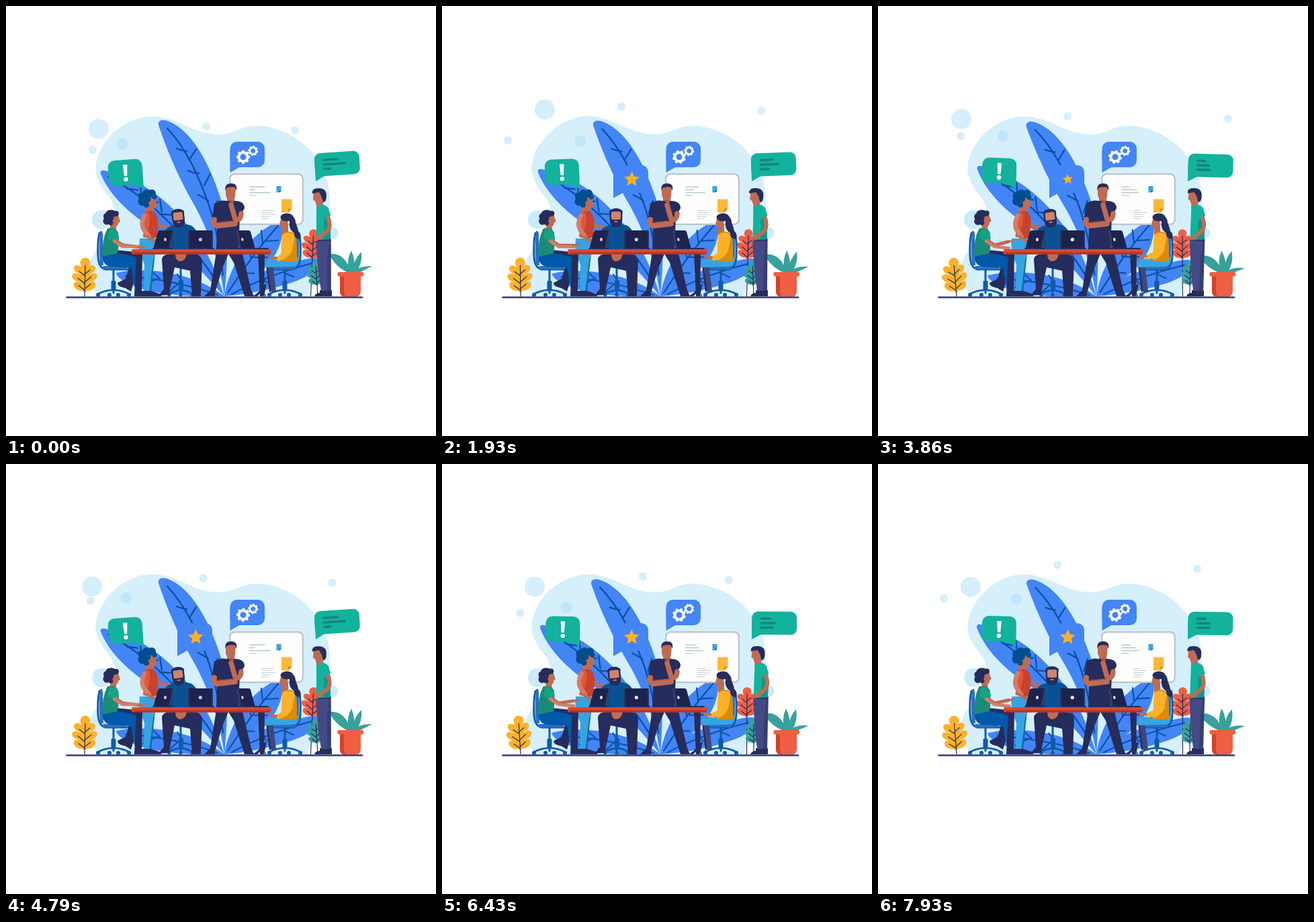
Animation, 640 px wide and 640 px high, one loop 8000 ms. Source, as an HTML page with a canvas:

```html
<!DOCTYPE html>
<html lang="en">
<head>
<meta charset="utf-8">
<title>Team meeting</title>
<style>
html, body { margin: 0; width: 100%; height: 100%; overflow: hidden; background: #fff; }
canvas { display: block; width: 100vw; height: 100vh; }
</style>
</head>
<body>
<canvas id="stage" width="640" height="640"></canvas>
<script>
const g = document.getElementById('stage').getContext('2d');
const LOOP = 8000, CYCLE = 6000, SWAY = 2400;
const NAVY = '#262c5b', BLUE = '#4385f5', VEIN = '#0a50a5', PALE = '#d5effb',
  CHAIR = '#0f5ba8', DENIM = '#0058a8', SKY = '#37a4e2', SKIN = '#bf6b54', TAN = '#d0806a',
  TEAL = '#13b29d', GREEN = '#1c8a78', GOLD = '#fdb12a', OCHRE = '#d88c0c', CORAL = '#f05e43',
  BRICK = '#c9422c', INDIGO = '#434a85', LEAF = '#38a19b';

const mix = (a, b, k) => a + (b - a) * k;
const smooth = (a, b, x) => {
  const k = Math.min(1, Math.max(0, (x - a) / (b - a)));
  return k * k * (3 - 2 * k);
};

function fill(color, d) {
  g.fillStyle = color;
  g.fill(new Path2D(d));
}
function line(color, width, d) {
  g.strokeStyle = color;
  g.lineWidth = width;
  g.lineCap = g.lineJoin = 'round';
  g.stroke(new Path2D(d));
}
function oval(color, x, y, rx, ry = rx, turn = 0) {
  g.fillStyle = color;
  g.beginPath();
  g.ellipse(x, y, rx, ry, turn, 0, 7);
  g.fill();
}
function box(color, x, y, w, h, r) {
  g.fillStyle = color;
  g.beginPath();
  g.roundRect(x, y, w, h, r);
  g.fill();
}
function pivot(x, y, turn, draw, scale = 1) {
  g.save();
  g.translate(x, y);
  g.rotate(turn);
  g.scale(scale, scale);
  g.translate(-x, -y);
  draw();
  g.restore();
}

// Closed smooth track through [seconds, x, y] stops.
function track(stops, ms, period = CYCLE / 1000) {
  const n = stops.length, t = ms / 1000 % period;
  const stop = i => {
    const wrap = Math.floor(i / n), p = stops[i - wrap * n];
    return [p[0] + wrap * period, p[1], p[2]];
  };
  let i = n - 1;
  while (stops[i][0] > t) i--;
  const [a, b, c, d] = [-1, 0, 1, 2].map(o => stop(i + o));
  const h = c[0] - b[0], k = (t - b[0]) / h, k2 = k * k, k3 = k2 * k;
  return [1, 2].map(q => {
    const m = (c[q] - a[q]) / (c[0] - a[0]) * h, e = (d[q] - b[q]) / (d[0] - b[0]) * h;
    return (2 * k3 - 3 * k2 + 1) * b[q] + (k3 - 2 * k2 + k) * m
      + (3 * k2 - 2 * k3) * c[q] + (k3 - k2) * e;
  });
}

const drifters = [
  [6, PALE, [[0, 298, 179], [1.07, 298, 150], [1.93, 267, 150], [3.86, 282, 164], [5.71, 304, 176]]],
  [6, PALE, [[0, 430, 185], [1.07, 430, 156], [1.93, 475, 156], [3.86, 521, 168], [5.71, 436, 185]]],
  [6, PALE, [[0, 129, 214], [1.07, 98, 229], [1.93, 98, 200], [3.86, 123, 194], [5.71, 126, 215]]],
  [8.5, '#bfe7f9', [[0, 173, 206], [1.07, 203, 222], [1.93, 206, 201], [3.86, 186, 194], [5.71, 173, 207]]]
];
const bigDrift = [[0, 138, 183], [1.07, 138, 154], [1.93, 153, 154], [2.9, 142, 136],
  [3.5, 129, 151], [3.86, 124, 168], [4.6, 127, 181], [5.71, 135, 184]];

function backdrop(t) {
  fill(PALE, 'M140 433C118 408 118 377 140 358C163 340 170 312 155 286C140 269 131 252 134 235'
    + 'C140 198 178 164 218 164C260 166 274 190 317 191C343 190 350 178 373 178'
    + 'C426 180 481 222 482 288C482 340 470 350 462 385Q455 415 448 433Z');
  oval('#cbebfa', 142, 318, 14);
  oval('#cbebfa', 486, 338, 8.5);
  const [x, y] = t < CYCLE ? track(bigDrift, t) : [138, 183];
  oval(PALE, x, y, 15);
  for (const [r, color, stops] of drifters) oval(color, ...track(stops, t), r);
}

function bigLeaves(s) {
  const X = 325, Y = 432;
  pivot(X, Y, -.03 * s, () => {
    fill(BLUE, 'M227 177C226 169 234 168 243 172C279 187 304 239 318 282C330 318 332 365 325 432'
      + 'C320 390 303 336 279 294C254 250 238 210 227 177Z');
    line(VEIN, 2.3, 'M240 182C269 213 287 253 303 299Q316 340 323 400'
      + 'M254 212Q261 215 269 216M283 213L274 227M271 245Q279 249 287 249M304 250L295 267'
      + 'M286 281Q296 286 301 290M315 290L309 308');
  });
  pivot(X, Y, .045 * s, () => {
    fill(BLUE, 'M141 250C139 243 146 244 155 247C203 258 247 294 277 335C302 366 315 402 325 432'
      + 'C294 398 266 366 225 335C180 308 153 279 141 250Z');
    line(VEIN, 2.3, 'M152 254C207 283 260 330 310 405M180 272L196 274M205 292L226 292'
      + 'M200 268L202 287M229 310L249 311M229 288L232 307M249 308L252 326M251 330L272 333');
  });
  pivot(X, Y, -.03 * s, () => {
    fill(BLUE, 'M164 397C205 387 280 396 325 432C275 434 212 429 185 414Q164 405 164 397Z');
    line(VEIN, 2, 'M178 402Q250 407 315 430M215 393L229 406M205 416L225 406M255 399L263 411M243 425L259 411');
  });
  pivot(X, Y, -.015 * s, () => {
    fill(BLUE, 'M410 319C416 338 407 365 390 385C373 404 348 420 325 432C329 404 344 372 366 348C382 332 400 321 410 319Z');
    line(VEIN, 2.2, 'M405 327Q365 372 330 427M382 353L380 334M386 350L405 349M365 376L361 359M369 374L389 374M350 398L345 382M351 397L369 398');
  });
  pivot(X, Y, .025 * s, () => {
    fill(BLUE, 'M464 376C466 394 447 405 421 413C391 423 360 429 325 432C350 409 385 392 417 384C444 377 458 373 464 376Z');
    line(VEIN, 2, 'M455 383Q390 400 336 429M417 395L408 387M414 397L428 403M386 407L379 399M382 408L395 414');
  });
}

function starBubble(t) {
  const grow = smooth(40, 600, t);
  if (!grow) return;
  pivot(255, 286, 0, () => {
    box(BLUE, 255, 237, 52, 41, 10);
    fill(BLUE, 'M255 247L255 286L271 277Z');
    const pulse = 1 - .32 * smooth(3200, 3800, t) * (1 - smooth(3950, 4600, t));
    const turn = .12 * Math.sin(t / 1000 * Math.PI / 1.5 + 2.4);
    pivot(282.5, 258, turn, () => {
      g.fillStyle = GOLD;
      g.beginPath();
      for (let i = 0; i < 10; i++) {
        const r = i % 2 ? 5.6 : 12, a = i * Math.PI / 5 - Math.PI / 2;
        g.lineTo(282.5 + r * Math.cos(a), 258 + r * Math.sin(a));
      }
      g.fill();
    }, pulse);
  }, grow);
}

function bars(color, width, x, y, gap, from, to, s) {
  from.forEach((len, i) => {
    const yy = y + i * gap;
    line(color, width, `M${x} ${yy}h${mix(len, to[i], s)}`);
  });
}

function board(s) {
  box('#bdc6c9', 332, 249, 111, 77, 8);
  box('#fefefe', 334.3, 251.3, 106.4, 72.4, 6);
  bars('#b5c9cc', 1.4, 363, 269.3, 4.2, [22, 7, 30, 8], [9, 25, 23, 11], s);
  bars('#bccbce', 1, 380.5, 304.4, 3.1, [18, 15, 20, 12, 9], [8, 20, 13, 15, 10], s);
  fill(SKY, 'M402.5 268h7v7l-2.5 2.5h-4.5Z');
  fill(NAVY, 'M409.5 275l-2.5 2.5v-2.5Z');
  fill('#fdb83b', 'M410 287.5h15.5v14l-5.5 6h-10Z');
  fill(OCHRE, 'M425.5 301.5l-5.5 6v-6Z');
}

function gear(x, y, r, turn) {
  pivot(x, y, turn, () => {
    g.strokeStyle = '#fff';
    g.lineWidth = r * .38;
    g.beginPath();
    g.arc(x, y, r * .65, 0, 7);
    g.stroke();
    for (let i = 0; i < 8; i++)
      pivot(x, y, i * Math.PI / 4, () => box('#fff', x - r * .19, y - r, r * .38, r * .3, .5));
  });
}

function bubbles(t, s) {
  box(BLUE, 333.5, 202, 51.5, 38, 10);
  fill(BLUE, 'M333.5 215V248L349 239Z');
  gear(353, 224.7, 10, t / 1500);
  gear(367.7, 215.6, 7.6, -t / 1200 + .2);

  pivot(205, 271, mix(-.07, .06, s), () => {
    box(TEAL, 154, 227, 51, 38, 10);
    fill(TEAL, 'M188 264L205 250V272Z');
    fill('#fff', 'M176.2 234.5h6.6l-1.2 16.5h-4.2Z');
    oval('#fff', 179.5, 256.2, 3.2);
  });

  pivot(461, 261, mix(-.065, .045, s), () => {
    box(TEAL, 461, 219.5, 67, 34.5, 9);
    fill(TEAL, 'M461 232V261L476 253Z');
    bars('#138579', 3.4, 475, 230, 6.7, [21, 31, 9], [9, 14, 21], s);
  });
}

function lobed(x, rise, size, color, turn) {
  pivot(x, 432, turn, () => {
    const y = 432 - rise;
    g.save();
    g.translate(x, y);
    g.scale(size, size);
    oval(color, 0, 3, 8, 22);
    oval(color, 1, -19, 7.5);
    for (const side of [-1, 1]) {
      oval(color, side * 9, -9, 7.5, 5.5, -side * .6);
      oval(color, side * 11, 3, 8.5, 5.5, -side * .5);
      oval(color, side * 8, 16, 9, 6, -side * .5);
    }
    line(NAVY, 1.2 / size, `M0 ${rise / size}L1 -15M0 -2L8 -8M0 0L-8 -6M0 10L10 2M0 12L-10 4M0 20L9 13M0 22L-9 15`);
    g.restore();
  });
}

function potPlant(s) {
  const blade = (d, turn) => pivot(513, 396, turn * s, () => fill(LEAF, d));
  blade('M509 397Q497 391 491 384Q483 376 482 369Q496 367 506 380Q511 388 514 397Z', -.12);
  blade('M510 397Q506 378 514 364Q521 379 517 397Z', -.1);
  blade('M514 397Q518 376 529 366Q531 382 521 397Z', -.1);
  blade('M517 397Q525 386 545 387Q534 393 521 399Z', .12);
  fill(CORAL, 'M497 401H528V424Q528 433 519 433H506Q497 433 497 424Z');
  fill('#cf432b', 'M497 401H503V424Q503 432 507 433H506Q497 433 497 424Z');
  box(CORAL, 493.5, 396, 38.5, 6.5, 2);
}

function chair(x, dir) {
  g.save();
  g.translate(x, 0);
  g.scale(dir, 1);
  line(CHAIR, 3, 'M-21 338Q-24 350 -23 373Q-22 390 -12 392H24');
  fill('#2a6fc0', 'M-20 335Q-16 334 -16 340L-15 386H-20Q-22 360 -20 335Z');
  box('#2a6fc0', -16, 387, 36, 5, 2);
  line(CHAIR, 3, 'M0 393V427M-24 429Q-10 422 0 423Q10 422 24 429');
  box(CHAIR, -3.5, 409, 7, 13, 1);
  for (const wx of [-23, -6, 7, 23]) oval(CHAIR, wx, 430, 3);
  g.restore();
}

function writer(s) {
  chair(160, 1);
  fill(NAVY, 'M163 363L192 366L200 380L188 400L190 412L186 425L178 420L171 418Q166 416 166 412L178 406L184 386L164 382Z');
  fill(DENIM, 'M144 369Q166 366 188 372Q199 374 199 384L202 425H193L186 390L158 388Q142 387 144 369Z');
  fill(NAVY, 'M192 424H203L213 430V432H192Z');
  pivot(155, 375, -.015 * s, () => {
    fill(SKIN, 'M155 322H164V334H155Z');
    fill(GREEN, 'M151 331Q162 328 167 337Q169 352 166 368L144 373Q142 348 151 331Z');
    fill('#13a385', 'M156 331Q166 333 168 345L165 352L152 347Q151 336 156 331Z');
    pivot(157, 330, -.08 * s, () => {
      fill(SKIN, 'M155 310Q167 306 168 314L170 321L167 323Q167 329 161 328L154 323Z');
      oval(NAVY, 157, 309, 8.5, 5.5, .1);
      for (const [x, y, r] of [[150, 313, 5], [150, 320, 5.5], [155, 316, 5], [164, 309, 4], [156, 323, 3.4]]) oval(NAVY, x, y, r);
    });
  });
  const hx = mix(206, 200, s), hy = mix(358, 348, s);
  line(SKIN, 5, `M163 349L174 356L${hx - 7} ${hy + 1}`);
  line(TAN, 4.5, `M161 350L173 358L${hx - 6} ${mix(358, 361, s)}`);
  line(SKIN, 3, `M${hx - 9} ${hy + 1}L${hx} ${hy}`);
}

function stander(s) {
  fill('#0b6eb8', 'M207 352L224 350L219 396L216 427H208Z');
  fill(SKY, 'M199 346H223Q227 361 219 378L213 427H205L206 385Q196 366 199 346Z');
  fill(NAVY, 'M202 424H216L231 429V432H200Z');
  pivot(212, 350, .07 * s, () => {
    line(SKIN, 5, 'M225 322L231 328L242 329');
    fill(SKIN, 'M207 295H217V312H207Z');
    fill(BRICK, 'M205 310Q211 303 220 306Q227 312 226 328L225 344Q214 349 205 343Z');
    fill('#e2563c', 'M207 306Q216 306 214 321L209 345L204 344Z');
    line(TAN, 6.5, 'M206 312Q200 325 205 333L213 343');
    line(SKIN, 4, 'M211 343L220 350');
    fill(SKIN, 'M209 286L222 284L224 294L225 297L222 299Q221 306 213 303Z');
    for (const [x, y, r] of [[202, 283, 5.5], [209, 279, 6], [217, 279, 6], [221, 284, 3.6], [203, 291, 6.5], [210, 287, 5.5], [209, 296, 4]])
      oval('#034e8c', x, y, r);
  });
}

function bearded(t) {
  const u = t % CYCLE;
  const nod = 1 - smooth(300, 900, u) * (1 - smooth(2600, 3400, u));
  line(CHAIR, 3, 'M260 380V427M241 429Q253 423 260 423Q268 423 279 429');
  box(CHAIR, 248, 382, 28, 6, 2);
  box(CHAIR, 257, 408, 7, 14, 1);
  for (const x of [243, 260, 277]) oval(CHAIR, x, 430, 2.6);
  fill(NAVY, 'M232 377Q233 369 246 369H278Q290 369 292 379L290 428V432H277L274 394L251 389L244 421L243 430L227 431L235 421Z');
  fill(SKIN, 'M252 369H269Q267 380 259 380Q252 379 252 369Z');
  fill('#0a5193', 'M236 336Q239 328 251 326L269 325Q282 327 284 338V363H234Z');
  line('#084579', 1.2, 'M249 348Q247 355 249 362M277 340Q273 347 274 362');
  pivot(259, 329, -.12 * nod, () => {
    g.translate(-nod, nod * .7);
    oval(NAVY, 259, 307, 9.8, 6);
    box('#cf856c', 250, 306, 18, 18, 5);
    box(NAVY, 249.6, 304, 2.4, 14, 1);
    box(NAVY, 266, 304, 2.4, 14, 1);
    fill(NAVY, 'M250 317Q259 319 268 317Q269 329 259 329Q249 329 250 317Z');
    oval('#cf856c', 259, 321, 3, 1);
  });
}

function thinker() {
  fill(NAVY, 'M314 360H350L365 423L369 432H355L339 382L331 369L322 390L311 427V432H295L304 423Z');
  fill(SKIN, 'M329 282H340V295H329Z');
  fill(NAVY, 'M310 294Q319 288 328 290L342 290Q355 291 355 301L348 313L346 362H313L314 331L307 315Z');
  fill(SKIN, 'M327 270Q335 265 342 270L341 284Q339 291 334 291Q328 289 327 280Z');
  fill(NAVY, 'M326.5 275Q325 264 335 264Q345 264 343 275L341 270Q334 268 328 271Z');
  line(SKIN, 8, 'M310 318Q308 326 315 327L341 324');
  line(SKIN, 7.5, 'M350 309Q349 321 341 317L335 296');
  line('#a95743', 3, 'M333 290L338 292');
  line('#a95743', 1, 'M315 322L337 320');
}

function listener(s) {
  chair(415, -1);
  fill(NAVY, 'M387 386H397L401 420L392 426Z');
  fill('#3e477d', 'M389 387H397L402 424L395 427Z');
  fill(NAVY, 'M388 413L385 427L387 432H385L383 423L374 432H367Q377 427 381 417Z');
  fill(SKY, 'M435 374Q438 388 424 388L386 389Q383 377 397 376Z');
  fill(SKIN, 'M411 326H420V340H411Z');
  fill(OCHRE, 'M413 337Q427 333 432 343Q434 362 433 380H410Q409 354 413 337Z');
  fill(GOLD, 'M411 340Q423 334 430 342L426 364Q421 374 411 378H409Z');
  fill(SKIN, 'M409 317H419L420 331Q411 337 409 327L407 325Z');
  oval(NAVY, 418, 314.5, 9.5, 6);
  fill(NAVY, 'M417 313Q430 309 431 322Q434 329 435 335Q442 343 436 347Q428 345 429 338Q420 332 422 321Z');
  const hx = mix(394, 390, s), hy = mix(375, 372, s);
  line(GOLD, 7.5, `M424 349L420 366L${hx + 12} ${hy + 1}`);
  line(SKIN, 4, `M${hx + 8} ${hy}L${hx} ${hy}`);
}

function speaker(s) {
  fill(NAVY, 'M474 423H485V432H472Z');
  fill(NAVY, 'M467 423H478V432H459Q461 427 467 427Z');
  pivot(475, 430, mix(-.015, .025, s), () => {
    fill('#373e74', 'M468 346H485L484 424H476Z');
    fill(INDIGO, 'M462 346H483L479 375L478 424H469L465 392Z');
    fill(SKIN, 'M464 286H474V302H464Z');
    fill(TEAL, 'M464 299Q475 292 482 301L485 320L484 347L463 348Z');
    fill('#0d9886', 'M475 317L485 316L484 347L474 347Z');
    fill(SKIN, 'M460 277Q468 270 475 277V290Q471 299 464 296L462 290L459 288Z');
    fill(NAVY, 'M458 279Q457 271 467 271Q480 271 479 283Q479 292 474 292L472 284L468 277Z');
    fill(TEAL, 'M472 298Q482 298 485 312L474 317Z');
    line(SKIN, 6, `M481 316Q486 328 480 335L${mix(463, 467, s)} 347`);
    line(NAVY, 1.2, 'M465 349H484');
  });
}

function table(s) {
  fill(NAVY, 'M194 367H203L202 424L204 432H191Z');
  fill(NAVY, 'M375 367H385L384 432H378Z');
  const glow = `rgb(${[190, 200, 230].map(c => Math.round(mix(c, 255, s)))})`;
  fill('#1d234c', 'M226 336Q227 334 229 334H248L243 362H219Z');
  fill('#343c70', 'M248 334H250L245 362H242Z');
  oval(glow, 237, 347.5, 2, 2.5, .2);
  box('#1d234c', 271, 334, 37, 27, 2);
  line('#444c7c', .8, 'M272 335V360M307 335V360');
  oval(glow, 289.3, 347.6, 2.6);
  fill('#1d234c', 'M343 334H361Q363 334 364 336L371 362H347Z');
  fill('#343c70', 'M343 334H346L350 362H347Z');
  oval(glow, 351.8, 347.5, 1.7, 2.5, -.2);
  line(NAVY, 1.8, 'M219 361H247M273 361H309M347 361H390');
  box('#d44a34', 187, 362, 208, 7.5, 2);
  box('#b8321f', 190, 366.5, 203, 3, 1);
}

function render(now) {
  const t = now % LOOP;
  const s = (1 - Math.cos((t + 65) / SWAY * 2 * Math.PI)) / 2;
  g.setTransform(1, 0, 0, 1, 0, 0);
  g.fillStyle = '#fff';
  g.fillRect(0, 0, 640, 640);
  backdrop(t);
  bigLeaves(s);
  starBubble(t);
  board(s);
  bubbles(t, s);
  lobed(117, 31, 1, GOLD, mix(0, -.13, s));
  lobed(453.5, 77, .86, CORAL, mix(.035, -.025, s));
  lobed(464, 34, .72, LEAF, mix(-.08, .02, s));
  potPlant(s);
  stander(s);
  writer(s);
  bearded(t);
  thinker();
  listener(s);
  speaker(s);
  table(s);
  line(INDIGO, 2.8, 'M90.5 433.7H530');
  requestAnimationFrame(render);
}
requestAnimationFrame(render);
</script>
</body>
</html>
```
